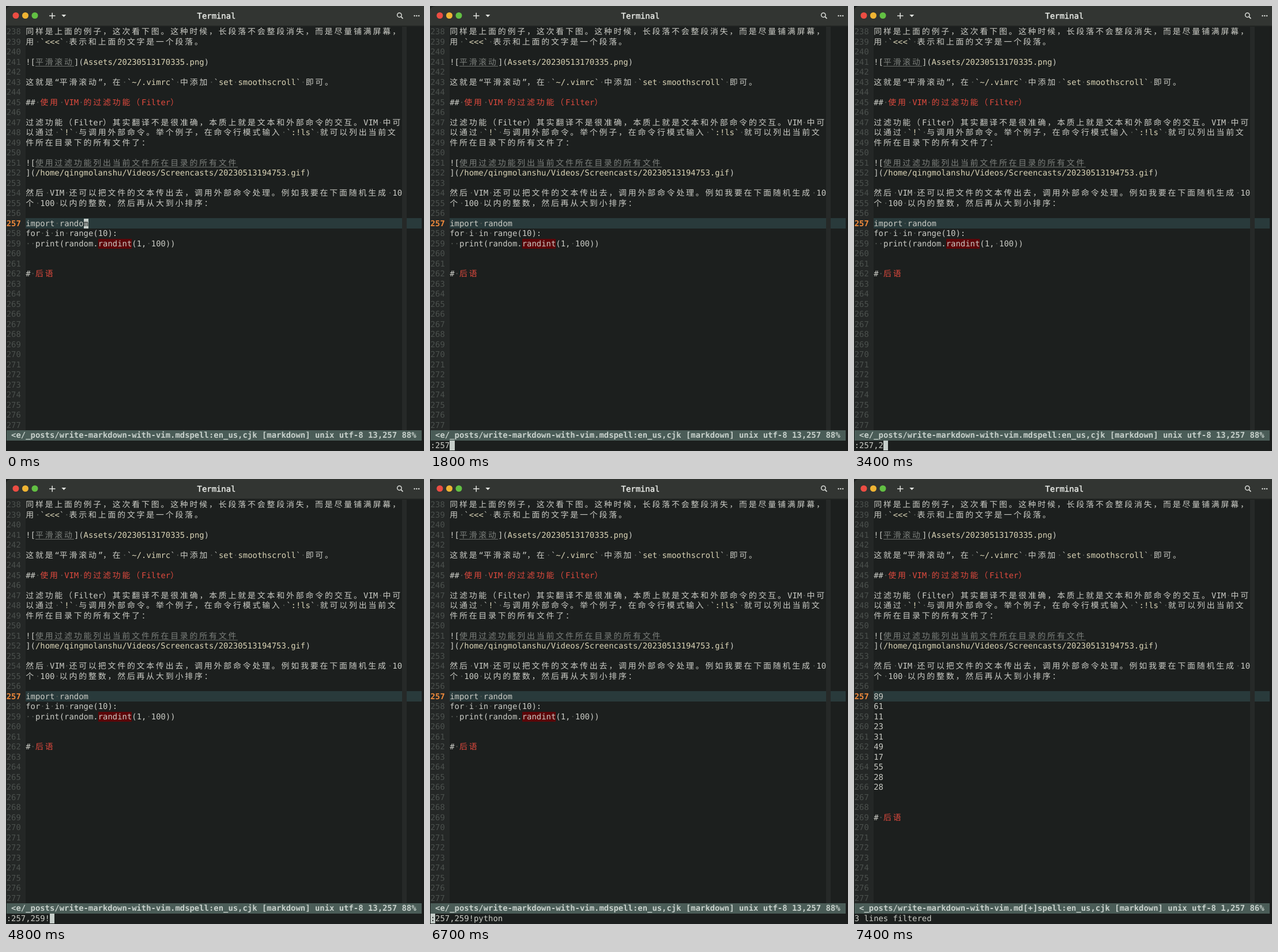
Recreate the animation shown at these times as an HTML page. Size 725 px wide and 772 px high, loop 8000 ms.

```html
<!DOCTYPE html>
<html lang="zh-CN">
<head>
<meta charset="utf-8">
<title>Terminal</title>
<style>
  html, body { margin: 0; width: 100%; height: 100%; overflow: hidden; background: #1c1f1e; }
  #stage {
    position: absolute; left: 0; top: 0; width: 725px; height: 772px; overflow: hidden;
    color: #cbccc6; font: 13.9px/19px "DejaVu Sans Mono", "Noto Sans CJK SC", "Noto Sans CJK", monospace;
    text-rendering: geometricPrecision; font-kerning: none;
    font-variant-ligatures: none; text-spacing-trim: space-all;
  }
  #stage div, #stage span { position: absolute; white-space: pre; }
  svg { position: absolute; left: 0; top: 0; }
  span { height: 17.5px; }
  .cjk { letter-spacing: 2.84px; }
  .n { color: #4b504d; }
  .o { color: #ef8a3c; font-weight: bold; }
  .r { color: #e04a3e; }
  .c { color: #dad4b6; }
  .u { height: 16px; color: #7d807d; box-shadow: inset 0 -1px #6d706d; }
  .h { background: #5c0508; }
  .s { color: #c8d1cc; font-weight: bold; }
  #stage .dot { color: #545954; background: none; box-shadow: none; }
  #gutter { left: 0; top: 36px; width: 34px; height: 700px; background: #242726; }
  #limit { left: 687px; top: 36px; width: 8px; height: 700px; background: #262928; }
  .line { top: 368px; height: 18px; background: #293a3b; }
  #bar { left: 1px; top: 736px; width: 720px; height: 18px; background: #4a5c57; }
  #edge { left: 721px; top: 35px; width: 4px; height: 737px; background: #1b1d1c; }
  #cursor { width: 8.37px; height: 17.5px; background: #c6ceca; color: #1c1f1e; }
</style>
</head>
<body>
<div id="stage">
  <div id="gutter"></div>
  <div class="line" style="left:34px;width:653px"></div>
  <div id="limit"></div>
  <div class="line" style="left:695px;width:26px"></div>
  <div id="bar"></div>
  <div id="edge"></div>
  <svg width="725" height="36">
    <path d="M0 36V10Q0 0 10 0H725V36Z" fill="#323532"/>
    <path d="M0 35H725" stroke="#212422" stroke-width="2"/>
    <circle cx="17" cy="16.5" r="5.5" fill="#ec4d43"/>
    <circle cx="33.5" cy="16.5" r="5.5" fill="#efb433"/>
    <circle cx="50" cy="16.5" r="5.5" fill="#62c043"/>
    <path d="M75 17H85.5M80.2 11.8V22.2" stroke="#e2e4e0" stroke-width="1.5"/>
    <path d="M96.3 15H104.3L100.3 19.3Z" fill="#e2e4e0"/>
    <circle cx="682.3" cy="15.7" r="3.7" fill="none" stroke="#dadcd8" stroke-width="1.5"/>
    <path d="M685 18.4L688.4 21.8" stroke="#dadcd8" stroke-width="1.8"/>
    <g fill="#dadcd8"><circle cx="708.5" cy="17" r="1.2"/><circle cx="712.3" cy="17" r="1.2"/><circle cx="716.1" cy="17" r="1.2"/></g>
    <text x="365" y="21.5" text-anchor="middle" fill="#eceeea" stroke="#eceeea" stroke-width=".4">Terminal</text>
  </svg>
  <div id="base"></div>
  <div id="before"></div>
  <div id="after"></div>
  <div id="cmd"></div>
  <div id="cursor"></div>
</div>
<script>
const W = 8.37, H = 17.5, X0 = 0.7, Y0 = 36, LOOP = 8000;
const CODE_ROW = 19, STATUS_ROW = 40, CMD_ROW = 41;
const $ = id => document.getElementById(id);
const CJK = /[\u3000-\u303f\u4e00-\u9fff\uff00-\uffef]/;
const RUNS = /[\u3000-\u303f\u4e00-\u9fff\uff00-\uffef]+| +|[^ \u3000-\u303f\u4e00-\u9fff\uff00-\uffef]+/g;

function place(el, col, row) {
  el.style.left = X0 + W * col + 'px';
  el.style.top = Y0 + H * row + 'px';
}

function put(box, text, col, row, cls = '') {
  const el = document.createElement('span');
  el.className = cls;
  el.textContent = text;
  place(el, col, row);
  box.append(el);
}

// {x:text} marks a piece with class x; spaces show as dots
function write(box, line, row) {
  let col = 4;
  for (const [, cls, marked, plain] of line.matchAll(/\{(\w):([^}]*)\}|([^{]+)/g)) {
    for (const run of (marked || plain).match(RUNS)) {
      const wide = CJK.test(run), blank = run[0] === ' ';
      put(box, blank ? run.replace(/ /g, '·') : run, col, row,
        (cls || '') + (wide ? ' cjk' : blank ? ' dot' : ''));
      col += run.length * (wide ? 2 : 1);
    }
  }
}

const prose = [
  '同样是上面的例子，这次看下图。这种时候，长段落不会整段消失，而是尽量铺满屏幕，',
  '用 `{c:<<<}` 表示和上面的文字是一个段落。',
  '',
  '![{u:平滑滚动}]({c:Assets/20230513170335.png})',
  '',
  '这就是“平滑滚动”，在 `{c:~/.vimrc}` 中添加 `{c:set smoothscroll}` 即可。',
  '',
  '## {r:使用 VIM 的过滤功能（Filter）}',
  '',
  '过滤功能（Filter）其实翻译不是很准确，本质上就是文本和外部命令的交互。VIM 中可',
  '以通过 `{c:!}` 与调用外部命令。举个例子，在命令行模式输入 `{c::!ls}` 就可以列出当前文',
  '件所在目录下的所有文件了：',
  '',
  '![{u:使用过滤功能列出当前文件所在目录的所有文件}',
  ']({c:/home/qingmolanshu/Videos/Screencasts/20230513194753.gif})',
  '',
  '然后 VIM 还可以把文件的文本传出去，调用外部命令处理。例如我要在下面随机生成 10',
  '个 100 以内的整数，然后再从大到小排序：'
];
const tail = ['', '', '# {r:后语}'];
const script = ['import random', 'for i in range(10):', '  print(random.{h:randint}(1, 100))'];
const output = '89 61 11 23 31 49 17 55 28 28'.split(' ');

for (let i = 0; i < 40; i++) put($('base'), String(238 + i), 0, i, i === CODE_ROW ? 'o' : 'n');
prose.forEach((s, i) => write($('base'), s, i));
[...script, ...tail].forEach((s, i) => write($('before'), s, CODE_ROW + i));
[...output, ...tail].forEach((s, i) => write($('after'), s, CODE_ROW + i));
put($('before'), '<e/_posts/write-markdown-with-vim.mdspell:en_us,cjk [markdown] unix utf-8 13,257 88%', 1, STATUS_ROW, 's');
put($('after'), '<_posts/write-markdown-with-vim.md[+]spell:en_us,cjk [markdown] unix utf-8 1,257 86%', 1, STATUS_ROW, 's');
place($('cmd'), 0, CMD_ROW);

const command = ':257,259!python';
// time, characters typed
const keys = [[300, 1], [1100, 2], [1400, 3], [1600, 4], [2500, 5], [3400, 6], [3800, 7],
  [4100, 8], [4800, 9], [5200, 10], [5400, 11], [5600, 12], [5800, 14], [6000, 15]];
const ENTER = 6700, DONE = 6800;
const hidden = t => (t >= 3200 && t < 3400) || t >= 7400;

function draw(now) {
  const t = now % LOOP, done = t >= DONE;
  const typed = keys.reduce((n, [at, count]) => t >= at ? count : n, 0);
  $('before').style.display = done ? 'none' : '';
  $('after').style.display = done ? '' : 'none';
  $('cmd').textContent = done ? '3 lines filtered' : command.slice(0, typed);

  let spot = [typed, CMD_ROW, ''];
  if (!typed) spot = [16, CODE_ROW, 'm'];
  else if (done) spot = [4, CODE_ROW, '8'];
  else if (t >= ENTER) spot = [0, CMD_ROW, ':'];
  const cursor = $('cursor');
  place(cursor, spot[0], spot[1]);
  cursor.textContent = spot[2];
  cursor.style.visibility = hidden(t) ? 'hidden' : 'visible';
}

const start = performance.now();
function tick() {
  draw(performance.now() - start);
  requestAnimationFrame(tick);
}
tick();
</script>
</body>
</html>
```
